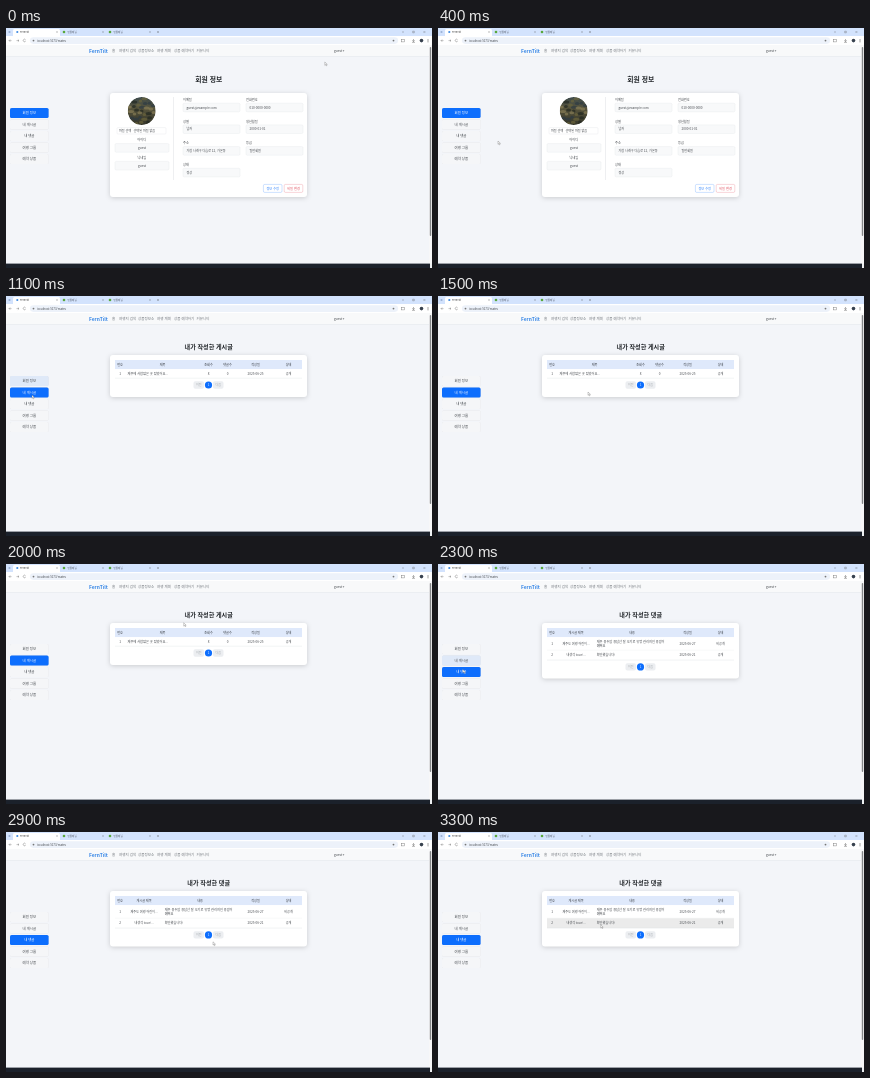
These frames come from a looping animation (426 by 240 pixels, 3.4 s). An HTML page:

```html
<!DOCTYPE html>
<html lang="ko">
<head>
<meta charset="utf-8">
<title>FernTilt</title>
<style>
html, body { margin: 0; width: 100%; height: 100%; overflow: hidden; background: #f3f5f9; }
svg { display: block; width: 100vw; height: 100vh; }
text { font-family: "Noto Sans CJK KR", "Noto Sans CJK", "Noto Sans", sans-serif; }
.card { filter: drop-shadow(0 1px 2.4px rgba(0,0,0,.17)); }
.item { filter: drop-shadow(0 .5px .6px rgba(0,0,0,.1)); }
</style>
</head>
<body>
<svg id="stage" viewBox="0 0 426 240" preserveAspectRatio="none">
  <defs>
    <linearGradient id="photo" x1="0" y1="0" x2="0" y2="1">
      <stop offset="0" stop-color="#3d4a4c"/>
      <stop offset=".4" stop-color="#57543c"/>
      <stop offset="1" stop-color="#34352a"/>
    </linearGradient>
    <clipPath id="avatar"><circle cx="135.7" cy="83" r="14"/></clipPath>
  </defs>
</svg>
<script>
const LOOP = 3400, STEP = 100;
const POSTS_AT = 1100, COMMENTS_AT = 2300;
const BLUE = '#0d6efd', INK = '#43474c', GREY = '#73787e';
const stage = document.getElementById('stage');

function add(parent, tag, attrs, content) {
  const el = document.createElementNS('http://www.w3.org/2000/svg', tag);
  for (const key in attrs) el.setAttribute(key, attrs[key]);
  if (content !== undefined) el.textContent = content;
  parent.append(el);
  return el;
}
const rect = (p, x, y, width, height, fill, extra) =>
  add(p, 'rect', { x, y, width, height, fill, ...extra });
const circle = (p, cx, cy, r, fill) => add(p, 'circle', { cx, cy, r, fill });
const line = (p, d, stroke, width = .5) =>
  add(p, 'path', { d, stroke, 'stroke-width': width, fill: 'none' });
// y is the visual middle of the line of text
const text = (p, x, y, str, size = 3.4, fill = INK, extra) =>
  add(p, 'text', { x, y: y + size * .38, 'font-size': size, fill, ...extra }, str);
const MID = { 'text-anchor': 'middle' };
const BOLD = { 'font-weight': 700 };
const center = (p, x, y, str, size, fill, extra) => text(p, x, y, str, size, fill, { ...MID, ...extra });
const group = () => add(stage, 'g', {});

function drawBrowser() {
  const g = group();
  rect(g, 0, 0, 426, 240, '#f3f5f9');
  rect(g, 0, 0, 426, 8, '#d3e3fd');
  rect(g, 7, 1, 47, 8, '#fff', { rx: 1.5 });
  rect(g, 0, 8, 426, 9, '#fff');
  circle(g, 3.5, 4, 1.1, '#9bb2d5');
  circle(g, 11.3, 4, 1.1, '#3f8ae0');
  text(g, 14, 4, 'FernTilt', 2.5, '#333');
  for (const x of [58, 104]) {
    circle(g, x, 4, 1.3, '#58a83c');
    text(g, x + 3.5, 4, '민들레님', 2.5, '#4a525e');
  }
  for (const x of [51, 97, 144]) line(g, `M${x - .6} 3.4l1.2 1.2m0-1.2l-1.2 1.2`, '#555', .35);
  line(g, 'M151 4h2M152 3v2M396 4h2M406.7 3.2h1.6v1.6h-1.6zM417.6 3.2l1.6 1.6m0-1.6l-1.6 1.6', '#555', .35);
  line(g, 'M5.5 12.6H3m1.1-1.1L3 12.6l1.1 1.1M10.5 12.6H13m-1.1-1.1l1.1 1.1-1.1 1.1', '#666', .4);
  line(g, 'M19.5 11.6a1.3 1.3 0 1 0 .2 1.5', '#555', .4);
  rect(g, 24, 9.3, 368, 6.6, '#edf2fa', { rx: 3.3 });
  circle(g, 27.5, 12.6, .9, '#777');
  text(g, 31, 12.5, 'localhost:5173/mates', 2.9, '#43474c');
  circle(g, 387.5, 12.6, .9, '#777');
  rect(g, 395.5, 11.3, 3, 2.6, 'none', { stroke: '#777', 'stroke-width': .45 });
  line(g, 'M407.5 11v2.5m-1.2-1.2l1.2 1.2 1.2-1.2M406 14.3h3', '#555', .45);
  circle(g, 415.5, 12.6, 1.8, '#38424f');
  line(g, 'M422 11v3.4', '#666', .6);

  rect(g, 0, 17, 423, 11.3, '#f8f9fa');
  rect(g, 0, 28, 423, .5, '#e1e4e8');
  text(g, 83, 23, 'FernTilt', 4.9, '#3485e6', BOLD);
  [[106, '홈'], [113, '여행지 검색'], [132, '상품정보소'], [151, '여행 계획'], [168, '상품 예약하기'], [190.5, '커뮤니티']]
    .forEach(([x, label]) => text(g, x, 22.9, label, 3.5, GREY));
  text(g, 328, 22.9, 'guest', 3.2, INK);
  add(g, 'path', { d: 'M336.6 22.4h1.8l-.9 1z', fill: INK });

  rect(g, 423, 17, 3, 219, '#f7f7f8');
  rect(g, 423.8, 19, 1.4, 189, '#858789', { rx: .7 });
  rect(g, 0, 235.6, 424, 4.4, '#1b212b');
  rect(g, 424, 235.6, 2, 4.4, '#eef0f2');
}

function drawCard(g, title, size, top, height) {
  center(g, 202.7, 51, title, size, '#212529', BOLD);
  rect(g, 104, top, 197, height, '#fff', { rx: 3, class: 'card' });
}

function drawAvatar(g) {
  const photo = add(g, 'g', { 'clip-path': 'url(#avatar)' });
  circle(photo, 135.7, 83, 14, 'url(#photo)');
  const tones = ['#20261f', '#8a8058', '#2c3a44', '#6d673c'];
  for (let i = 0; i < 28; i++) {
    const angle = i * 2.4, reach = 2.6 * Math.sqrt(i);
    add(photo, 'ellipse', {
      cx: 135.7 + reach * Math.cos(angle), cy: 83 + reach * Math.sin(angle),
      rx: 1.8 + i % 3 * .6, ry: 1.5, fill: tones[i % 4], opacity: .65
    });
  }
}

function field(g, x, y, width, value, centered) {
  rect(g, x, y, width, 8.6, '#f8f9fa', { rx: 1.2, stroke: '#e6e8eb', 'stroke-width': .4 });
  if (centered) center(g, x + width / 2, y + 4.4, value, 3.1);
  else text(g, x + 3.5, y + 4.4, value, 3.1);
}

function drawProfile() {
  const g = group();
  drawCard(g, '회원 정보', 6.8, 65, 104);
  drawAvatar(g);
  rect(g, 111, 99.6, 49, 6.4, '#fff', { rx: 1, stroke: '#e2e5e8', 'stroke-width': .4 });
  text(g, 113, 102.8, '파일 선택', 3.1);
  text(g, 127.5, 102.8, '선택된 파일 없음', 3.1);
  center(g, 135.7, 111.8, '아이디', 3.3);
  field(g, 109, 115.6, 54, 'guest', true);
  center(g, 135.7, 129.5, '닉네임', 3.3);
  field(g, 109, 133.4, 54, 'guest', true);
  line(g, 'M167.5 69v83', '#dcdfe3');
  [['이메일', 'guest@example.com', '전화번호', '010-0000-0000'],
   ['성별', '남자', '생년월일', '2000-01-01'],
   ['주소', '가람 나래구 다솜로 12, 가온동', '등급', '일반회원'],
   ['상태', '정상']].forEach((row, i) => {
    for (let k = 0; k < row.length; k += 2) {
      const x = k ? 240 : 177, y = 71.7 + i * 21.7;
      text(g, x, y, row[k], 3.2);
      field(g, x, y + 3.5, 57, row[k + 1]);
    }
  });
  [[257.4, '정보 수정', BLUE], [278.2, '비밀 변경', '#dc3545']].forEach(([x, label, color]) => {
    rect(g, x, 156.4, 18.6, 8, '#fff', { rx: 1.3, stroke: color, 'stroke-width': .4, 'stroke-opacity': .5 });
    center(g, x + 9.3, 160.4, label, 3.2, color, { 'fill-opacity': .85 });
  });
  return { g, rows: [] };
}

function tableRow(g, top, height) {
  const bg = rect(g, 109, top, 187, height, '#fff');
  line(g, `M109 ${top + height}h187`, '#dfe2e6', .4);
  return { bg, top, bottom: top + height };
}

function drawTable(title, height, headers, heights) {
  const g = group();
  drawCard(g, title, 6.1, 59, height);
  rect(g, 109, 64, 187, 9.2, '#dfe9fb');
  headers.forEach(([x, label]) => center(g, x, 68.4, label, 3.1, '#363b41', { 'font-weight': 500 }));
  let top = 73.2;
  const rows = heights.map(h => {
    const row = tableRow(g, top, h);
    top += h;
    return row;
  });
  const y = top + 6.8;
  for (const [x, label] of [[187.5, '이전'], [207, '다음']]) {
    rect(g, x, y - 3.7, 10.5, 7.4, '#eceef1', { rx: 1.8 });
    center(g, x + 5.25, y, label, 3, '#a2a7ad');
  }
  circle(g, 202.5, y, 3.6, BLUE);
  center(g, 202.5, y, '1', 3, '#fff');
  return { g, rows };
}

function drawPosts() {
  const page = drawTable('내가 작성한 게시글', 42,
    [[114, '번호'], [156.5, '제목'], [202.5, '조회수'], [221.5, '댓글수'], [249.5, '작성일'], [282.5, '상태']], [9]);
  [[114, '1'], [202.5, '8'], [221.5, '0'], [249.5, '2025-06-25'], [282.5, '공개']]
    .forEach(([x, s]) => center(page.g, x, 77.6, s, 3.1));
  text(page.g, 121.5, 77.6, '제주에 사람많은 곳 있었어요...', 3.2);
  return page;
}

function drawComments() {
  const page = drawTable('내가 작성한 댓글', 55.5,
    [[114, '번호'], [138, '게시글 제목'], [194, '내용'], [249.5, '작성일'], [282.5, '상태']], [13.2, 9.7]);
  const { g } = page;
  [['1', '제주도 여행 어린이...', '2025-06-27', '비공개', 79.6], ['2', '내생각 tour!...', '2025-06-21', '공개', 91.2]]
    .forEach(([no, title, date, state, y]) => {
      center(g, 114, y, no, 3.1);
      center(g, 138, y, title, 3.1);
      center(g, 249.5, y, date, 3.1);
      center(g, 282.5, y, state, 3.1);
    });
  text(g, 158.7, 77.3, '제주 용두암 용담산 잘 오기로 유명 관리지인 용암이', 3.2);
  text(g, 158.7, 81.8, '예뻐요', 3.2);
  text(g, 158.7, 91.2, '확인했습니다!', 3.2);
  return page;
}

drawBrowser();
const pages = [drawProfile(), drawPosts(), drawComments()];
const menu = ['회원 정보', '내 게시글', '내 댓글', '여행 그룹', '예약 상품'].map((label, i) => {
  const g = group(), y = 80 + i * 11.5;
  return {
    y,
    bg: rect(g, 4, y, 38.6, 10, '#f5f6f8', { rx: 1.6, class: 'item' }),
    label: center(g, 23.3, y + 5, label, 3.4, INK)
  };
});
const pointer = add(stage, 'path', {
  d: 'M0 0v3.3l.8-.7.6 1.3.6-.3-.6-1.2h1.1z', fill: '#fff', stroke: '#555', 'stroke-width': .3
});

// time, x, y of the pointer tip
const path = [
  [0, 318.8, 34], [200, 205, 68], [400, 60, 113], [600, 28, 128], [800, 26, 104], [900, 26, 99],
  [1300, 26, 99], [1500, 150, 96], [1600, 262, 88], [1700, 280, 60], [1800, 235, 55], [1900, 190, 57],
  [2000, 177.7, 58.8], [2200, 40, 102], [2300, 25, 105.5], [2400, 27, 105], [2500, 68, 90],
  [2600, 120.7, 73.8], [2700, 150, 85], [2900, 207, 109.8], [3000, 205, 109], [3100, 190, 104],
  [3300, 162.7, 92.7], [LOOP, 162.7, 92.7]
];

function pointerAt(t) {
  const i = path.findIndex(p => p[0] > t);
  const [t0, x0, y0] = path[i - 1], [t1, x1, y1] = path[i];
  const u = (t - t0) / (t1 - t0);
  return [x0 + (x1 - x0) * u, y0 + (y1 - y0) * u];
}

function render(t) {
  const [x, y] = pointerAt(t);
  const active = t < POSTS_AT ? 0 : t < COMMENTS_AT ? 1 : 2;
  const switchedAt = [-Infinity, POSTS_AT, COMMENTS_AT][active];
  pages.forEach((page, i) => {
    page.g.setAttribute('display', i === active ? 'inline' : 'none');
    for (const row of page.rows) {
      const hover = x > 109 && x < 296 && y >= row.top && y < row.bottom;
      row.bg.setAttribute('fill', hover ? '#ebebeb' : '#fff');
    }
  });
  menu.forEach((item, i) => {
    const hover = x > 4 && x < 43 && y >= item.y && y < item.y + 10;
    const fading = i === active - 1 && t - switchedAt < STEP;
    item.bg.setAttribute('fill', i === active ? BLUE : fading ? '#dfe9f8' : hover ? '#e4e7eb' : '#f5f6f8');
    item.label.setAttribute('fill', i === active ? '#fff' : INK);
    item.label.setAttribute('font-weight', i === active ? 500 : 400);
  });
  pointer.setAttribute('transform', `translate(${x} ${y})`);
}

const start = performance.now();
function tick() {
  const t = (performance.now() - start) % LOOP;
  render(Math.floor(t / STEP) * STEP);
  requestAnimationFrame(tick);
}
tick();
</script>
</body>
</html>
```
